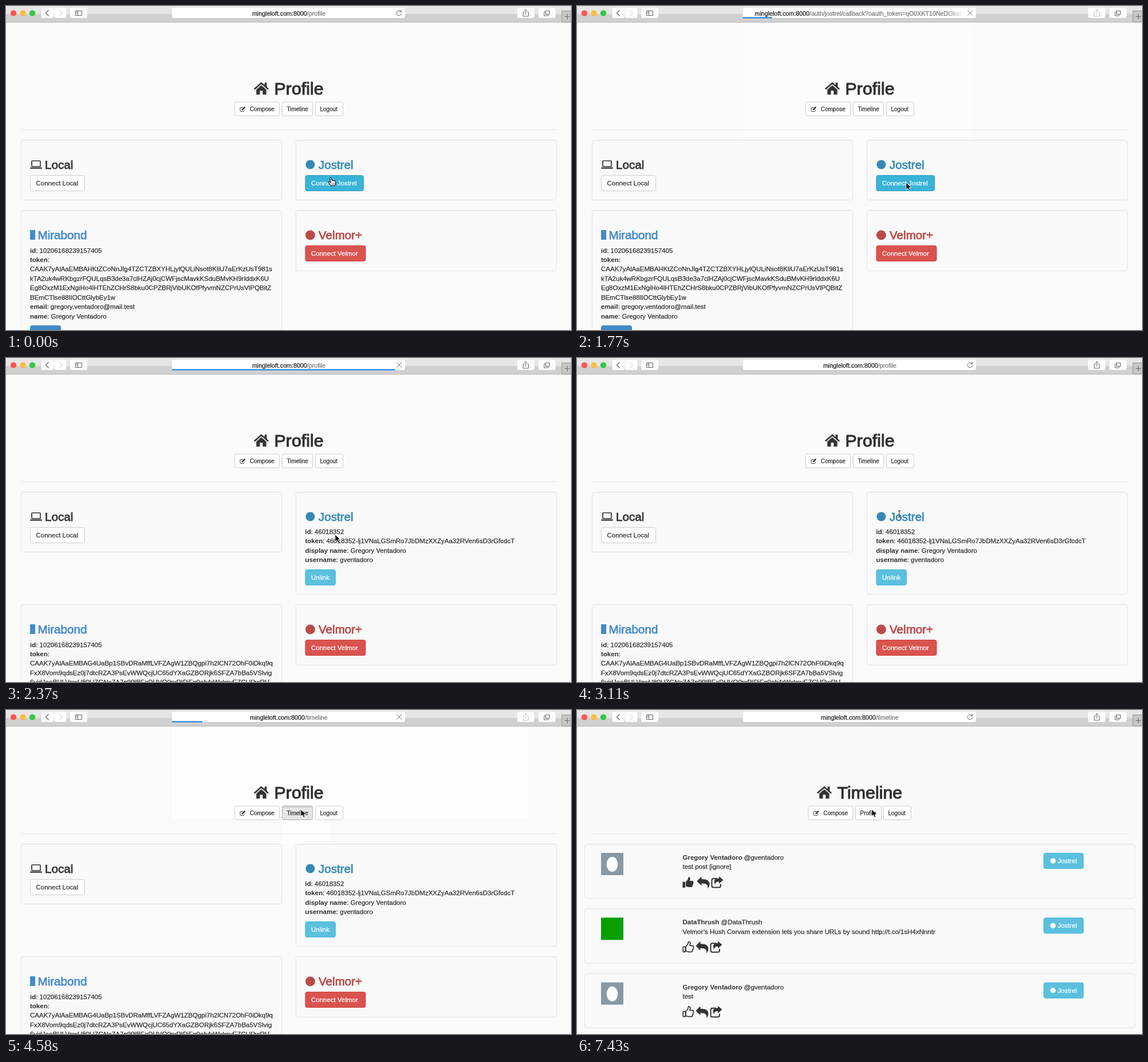
Recreate the animation shown at these times as an HTML page. Size 987x567 px, loop 8000 ms.

```html
<!DOCTYPE html>
<html lang="en">
<head>
<meta charset="utf-8">
<title>Profile and timeline</title>
<style>
html, body { margin: 0; width: 100%; height: 100%; overflow: hidden; background: #fafafa; }
svg { display: block; font: 11.5px "Liberation Sans", Arial, sans-serif; color: #2e2e2e; fill: #333; }
text, tspan { white-space: pre; fill: currentColor; stroke: currentColor; stroke-width: .25; }
.h1 { font-size: 30.4px; stroke-width: 1; }
.h3 { font-size: 20.6px; stroke-width: .75; }
.small { font-size: 10px; }
.url { font-size: 10.7px; color: #777; }
.url tspan { color: #1c1c1c; }
.line { fill: none; stroke: #333; }
.thin { fill: none; stroke: #666; }
.b { font-weight: 700; stroke: none; }
</style>
</head>
<body>
<svg id="stage" width="987" height="567" viewBox="0 0 987 567"></svg>
<script>
const LOOP = 8000, SITE = 'mingleloft.com:8000';
const USER = 'Gregory Ventadoro', NICK = 'gventadoro';
const stage = document.getElementById('stage');

const rect = (x, y, w, h, fill, more = '') =>
  `<rect x="${x}" y="${y}" width="${w}" height="${h}" fill="${fill}" ${more}/>`;
const text = (x, y, s, cls = '', more = '') => `<text x="${x}" y="${y}" class="${cls}" ${more}>${s}</text>`;
const path = (d, more = 'class="line"') => `<path d="${d}" ${more}/>`;
const group = (x, y, s) => `<g transform="translate(${x} ${y})">${s}</g>`;
const dot = (x, y, r, fill) => `<circle cx="${x}" cy="${y}" r="${r}" fill="${fill}"/>`;
const bold = s => `<tspan class="b">${s}</tspan>`;
const field = (key, value = '') => `${bold(key)}: ${value}`;
const lines = (x, y, list) => list.map((s, i) => text(x, y + i * 16.45, s)).join('');

const well = (x, y, w, h) => rect(x + .5, y + .5, w - 1, h - 1, '#f9f9f9', 'rx="3" stroke="#e3e3e3"')
  + rect(x + 2, y + 1, w - 4, 1, '#f0f0f0');
const button = (x, y, w, label, fill, edge, ink = '#fff', pad = 10.5) =>
  rect(x + .5, y + .5, w - 1, 27, fill, `rx="3" stroke="${edge}"`)
  + text(x + pad, y + 18, label, '', `style="color:${ink}"`);
const smallButton = (x, w, label, pad = 9, fill = '#fff', edge = '#ccc') =>
  rect(x + .5, 168, w - 1, 24, fill, `rx="2.5" stroke="${edge}"`) + text(x + pad, 183.5, label, 'small');
const heading = (x, y, label, color) => text(x, y, label, 'h3', `style="color:${color}"`);

const house = path('M.8 13.5L13 3L25.2 13.5', 'class="line" stroke-width="2.7"')
  + path('M18.8 2h3.7v8l-3.7-3zM4.300 14.300L13 6.800L21.700 14.300V23H15.400V16.300H10.600V23H4.300Z', '');
const edit = path('M8 6v2.5q0 1-1 1H2q-1 0-1-1v-5q0-1 1-1H6', 'class="line" stroke-width=".9"')
  + path('M4 7.2l.3-2L8.6.8l1.6 1.6L6 7z', '');
const laptop = rect(3, 1, 15, 10, 'none', 'rx="1" stroke="#333" stroke-width="1.7"')
  + rect(0, 12.6, 21, 2.2, '#333', 'rx="1"');

const thumbShape = 'M6 9.5q3-2 4-5l.5-3q3-.7 3.3 2.4L13 8h4.7q2.2.4 1.4 2.4q1 1.4-.3 2.8q.5 1.6-.9 2.6q0 3-2.6 3.2H12q-3 0-6-1.4z';
const thumb = full => path(thumbShape, full ? '' : 'class="line" stroke-width="1.7"')
  + (full ? rect(.5, 9.5, 4.5, 10.5, '#333', 'rx="1"')
          : rect(1.3, 10, 4.2, 9, 'none', 'rx="1" stroke="#333" stroke-width="1.7"'));
const reply = path('M0 7.5L8-.5V4Q22 3.6 22 13q0 4-3.6 7.5q2.6-9.3-10.4-9V15.5Z', '');
const share = path('M11 3H5Q1.5 3 1.5 6v9.5q0 3 3 3H14q3 0 3-3V12.5', 'class="line" stroke-width="2"')
  + path('M14-1l7.5 6.5L14 12V8.3Q7.5 8 7.3 14Q2.5 2.6 14 2.7Z', '');

const header = (title, iconX, titleX) => group(iconX, 132, house) + text(titleX, 154.5, title, 'h1')
  + rect(26, 216, 936, 1, '#e7e7e7');
const compose = x => smallButton(x, 79, 'Compose', 27) + group(x + 9, 175, edit);

const TOKEN_A = ['CAAK7yAlAaEMBAHKtZCoNnJlg4TZCTZBXYHLjylQULiNsot8KliU7aErKzUsT981s',
  'kTA2uk4wRKbgzrFQULqsB3de3a7clHZAj0cjCWFjscMavkKSduBMvKH9rlddxK6U',
  'Eg8OxzM1ExNgiHo4lHTEhZCHrS8bku0CPZBRjVibUKOfPfyvmNZCPrUsVlPQBitZ',
  'BEmCTlse88lIOCttGlybEy1w'];
const TOKEN_B = ['CAAK7yAlAaEMBAG4UaBp1SBvDRaMffLVFZAgW1ZBQgpi7h2lCN72OhF0iDkq9q',
  'FxX8Vom9qdsEz0j7dtcRZA3PsEvWWQcjUC65dYXaGZBORjk6SFZA7bBa5VSlvig',
  '6vidJooBULVowH80UZGNxZA7p99lBExDUVO0rxRIPiFq0ob4rWxksvEZCURwRH'];

function profile(linked) {
  const y = linked ? 431 : 357;
  const details = linked
    ? lines(522.5, 308, [field('id', '46018352'),
        field('token', '46018352-lj1VNaLGSmRo7JbDMzXXZyAa32RVen6sD3rGfcdcT'),
        field('display name', USER), field('username', NICK)])
      + button(522.5, 370, 53.5, 'Unlink', '#5bc0de', '#46b8da')
    : button(522.5, 296, 102.5, 'Connect Jostrel', '#39b3d7', '#269abc');
  return header('Profile', 433, 468.5) + compose(399)
    + `<g id="tab${+linked}">${smallButton(482, 54, 'Timeline', 8.5)}</g>` + smallButton(540, 49, 'Logout', 8.5)
    + well(26, 234, 456, 106) + group(42, 270, laptop) + heading(68, 284.5, 'Local', '#333')
    + button(42, 296, 96, 'Connect Local', '#fff', '#ccc', '#333')
    + well(506, 234, 456, linked ? 180 : 106) + dot(531.5, 277.5, 8, '#3688b5')
    + heading(546, 284.5, 'Jostrel', '#3688b5') + details
    + well(26, y, 456, 300) + rect(42, y + 35, 9, 17, '#428bca') + heading(55.5, y + 50.5, 'Mirabond', '#428bca')
    + lines(42, y + 74.5, [field('id', '10206168239157405'), field('token'),
        ...(linked ? TOKEN_B : TOKEN_A),
        field('email', 'gregory.ventadoro@mail.test'), field('name', USER)])
    + (linked ? '' : button(42, 559, 54, 'Unlink', '#428bca', '#357ebd'))
    + well(506, y, 456, 107) + dot(531.5, y + 44, 8.5, '#b94a48') + heading(546, y + 50.5, 'Velmor+', '#b94a48')
    + button(522.5, y + 62, 106, 'Connect Velmor', '#d9534f', '#d43f3a');
}

function post(i, name, nick, message, liked) {
  const avatar = nick === NICK
    ? rect(42, 16, 39, 39, '#8899a6') + '<ellipse cx="61.5" cy="36" rx="9.8" ry="13" fill="#fff"/>'
    : rect(42, 16, 39, 39, '#0a9e01');
  const shift = liked ? 2 : 0;
  return group(0, 234 + i * 113.35, well(13, 0, 962, 96) + avatar
    + lines(184.5, 28, [`${bold(name)} @${nick}`, message])
    + group(184, 57, thumb(liked)) + group(207.5 + shift, 58, reply) + group(232 + shift, 58, share)
    + button(815, 16, 70, 'Jostrel', '#5bc0de', '#46b8da', '#fff', 24.5) + dot(831.5, 30, 4.7, '#fff'));
}

const timeline = () => rect(13, 29, 962, 538, '#f9f9f9') + header('Timeline', 419, 454.5) + compose(403.5)
  + smallButton(486, 46, 'Profile', 8.5) + smallButton(535, 49, 'Logout', 8.5)
  + post(0, USER, NICK, 'test post [ignore]', true)
  + post(1, 'DataThrush', 'DataThrush',
      'Velmor’s Hush Corvam extension lets you share URLs by sound http://t.co/1sH4xNnntr', false)
  + post(2, USER, NICK, 'test', false);

const chromeButton = (x, w) => rect(x, 3, w, 18, '#fcfcfc', 'rx="3"');
const toolbar = () => rect(0, 0, 987, 28, '#e6e6e6') + rect(0, 14, 987, 14, '#d0d0d0') + rect(0, 28, 987, 1, '#b8b8b8')
  + dot(13, 12.5, 5.2, '#fc5753') + dot(29.5, 12.5, 5.2, '#fdbc40') + dot(46, 12.5, 5.2, '#33c748')
  + [[61.5, 22], [84, 21.5], [112, 30], [893, 30], [930, 30]].map(b => chromeButton(...b)).join('')
  + path('M74.5 7.5l-5 5l5 5', 'class="thin" stroke-width="1.3"')
  + path('M93 7.5l5 5l-5 5', 'fill="none" stroke="#ccc"')
  + path('M121.5 8.5h11v8h-11zM125.5 8.5v8M122.5 10.5h2M122.5 12.5h2', 'class="thin"')
  + path('M905.5 10.5h-2V18h9v-7.5h-2M908 15V6.5M905.5 8.8l2.5-2.5l2.5 2.5', 'id="shareIcon" class="thin"')
  + path('M942.5 8.5h7v6h-7zM942.5 10.5h-2.5v6.5h7v-2.5', 'class="thin"')
  + rect(971, 8.5, 20, 19.5, '#c6c6c6', 'stroke="#999"') + path('M976 18.5h9M980.5 14v9', 'class="thin"')
  + rect(290, 3, 407, 18, '#fff', 'rx="3"')
  + '<text id="url" class="url" y="16.5"></text>'
  + rect(645, 4, 50, 14, 'url(#fade)', 'id="urlFade"')
  + path('M690.2 10A4.300 4.300 0 1 0 690.9 13M690.7 6.8v3.5h-3.5', 'id="reload" class="thin"')
  + path('M682.5 8l8.5 8.5M691 8l-8.5 8.5', 'id="stop" class="thin"')
  + rect(290, 19.5, 0, 2, '#1a7bec', 'id="bar"');

const cursors = {
  hand: path('M-1.2 1Q0-1 1.3 1L2.2 5Q3.7 4 4.5 5.5Q6 4.7 6.7 6.2Q8.6 5.7 8.7 7.8V10.5Q8 12.5 7.5 14.5H.5Q-1.5 11.5-3.7 8.6Q-3.6 6.8-1.5 7.8L.3 9.2Z',
      'fill="#fff" stroke="#111" stroke-width="1.1"') + path('M2.5 10v3M4.5 10v3M6.2 10v3', 'class="line" stroke-width=".7"'),
  arrow: path('M0 0V12L2.8 9.5L4.8 14L6.9 13L5 8.8H8.7Z', 'fill="#000" stroke="#fff" stroke-width=".8"'),
  beam: path('M-2.5-6Q0-6 0-4.5Q0-6 2.5-6M0-5V5M-2.5 6Q0 6 0 4.5Q0 6 2.5 6M-1.5 1.5h3', 'fill="none" stroke="#222"')
};

const layer = (id, s) => `<g id="${id}">${s}</g>`;
const glow = (x, y, w, h, alpha) => rect(x, y, w, h, '#fff', `opacity="${alpha}"`);
stage.innerHTML = '<linearGradient id="fade"><stop stop-color="#fff" stop-opacity="0"/>'
  + '<stop offset=".65" stop-color="#fff"/></linearGradient>'
  + rect(0, 0, 987, 567, '#fafafa')
  + layer('glowA', glow(290, 29, 401, 296, .5)) + layer('glowB', glow(482, 190, 85, 45, .6))
  + layer('glowC', glow(290, 29, 622, 161, .8))
  + layer('before', profile(false)) + layer('after', profile(true)) + layer('feed', timeline())
  + toolbar() + Object.entries(cursors).map(([id, s]) => layer(id, s)).join('');
const el = id => document.getElementById(id);
el('tab1').insertAdjacentHTML('beforeend', layer('pressed', smallButton(482, 54, 'Timeline', 8.5, '#e6e6e6', '#adadad')
  + rect(483, 169, 52, 2, '#d3d3d3')));

// Each row holds from its time until the next one.
const PROGRESS = [[0, 0], [880, 20], [1030, 42], [1180, 51], [1920, 52], [2070, 130], [2220, 260], [2370, 390], [2520, 0],
  [3700, 20], [3850, 42], [4000, 53], [6980, 150], [7130, 280], [7280, 400], [7430, 0]];
const PAGES = [[0, '/profile'], [880, '/connect/jostrel'],
  [1470, '/auth/jostrel/callback?oauth_token=qO0XKT10NeDt3kaC'], [1920, '/profile'], [3700, '/timeline']];
const POINTER = [[0, 'hand', 567, 300], [150, 'hand', 570, 303], [290, 'hand', 573, 307], [440, 'hand', 575, 309],
  [1180, 'arrow', 575, 309], [3110, 'beam', 563, 273], [3260, 'hand', 515, 174], [4000, 'arrow', 515, 174]];
const at = (rows, t) => rows.findLast(row => row[0] <= t).slice(1);
const show = (id, on) => el(id).setAttribute('display', on ? 'inline' : 'none');

let address;
function setAddress(next) {
  if (next === address) return;
  address = next;
  const long = next.length > 30, url = el('url');
  url.setAttribute('x', long ? 310.5 : 494);
  url.setAttribute('text-anchor', long ? 'start' : 'middle');
  url.innerHTML = `<tspan>${SITE}</tspan>${next}`;
  show('urlFade', long);
}

function draw(t) {
  const [progress] = at(PROGRESS, t), [kind, x, y] = at(POINTER, t);
  const within = (from, to) => t >= from && t < to;
  show('before', t < 1920);
  show('after', within(1920, 6830));
  show('feed', t >= 6830);
  show('pressed', within(3260, 6830));
  show('glowA', within(1180, 1920));
  show('glowB', within(3260, 6830));
  show('glowC', within(3700, 6830));
  setAddress(at(PAGES, t)[0]);
  el('bar').setAttribute('width', progress);
  show('stop', progress > 0);
  show('reload', !progress);
  el('shareIcon').setAttribute('opacity', within(880, 1920) || within(3700, 6830) ? .35 : 1);
  for (const id in cursors) show(id, id === kind);
  el(kind).setAttribute('transform', `translate(${x} ${y})`);
}

const start = performance.now();
(function tick() {
  draw((performance.now() - start) % LOOP);
  requestAnimationFrame(tick);
})();
</script>
</body>
</html>
```
